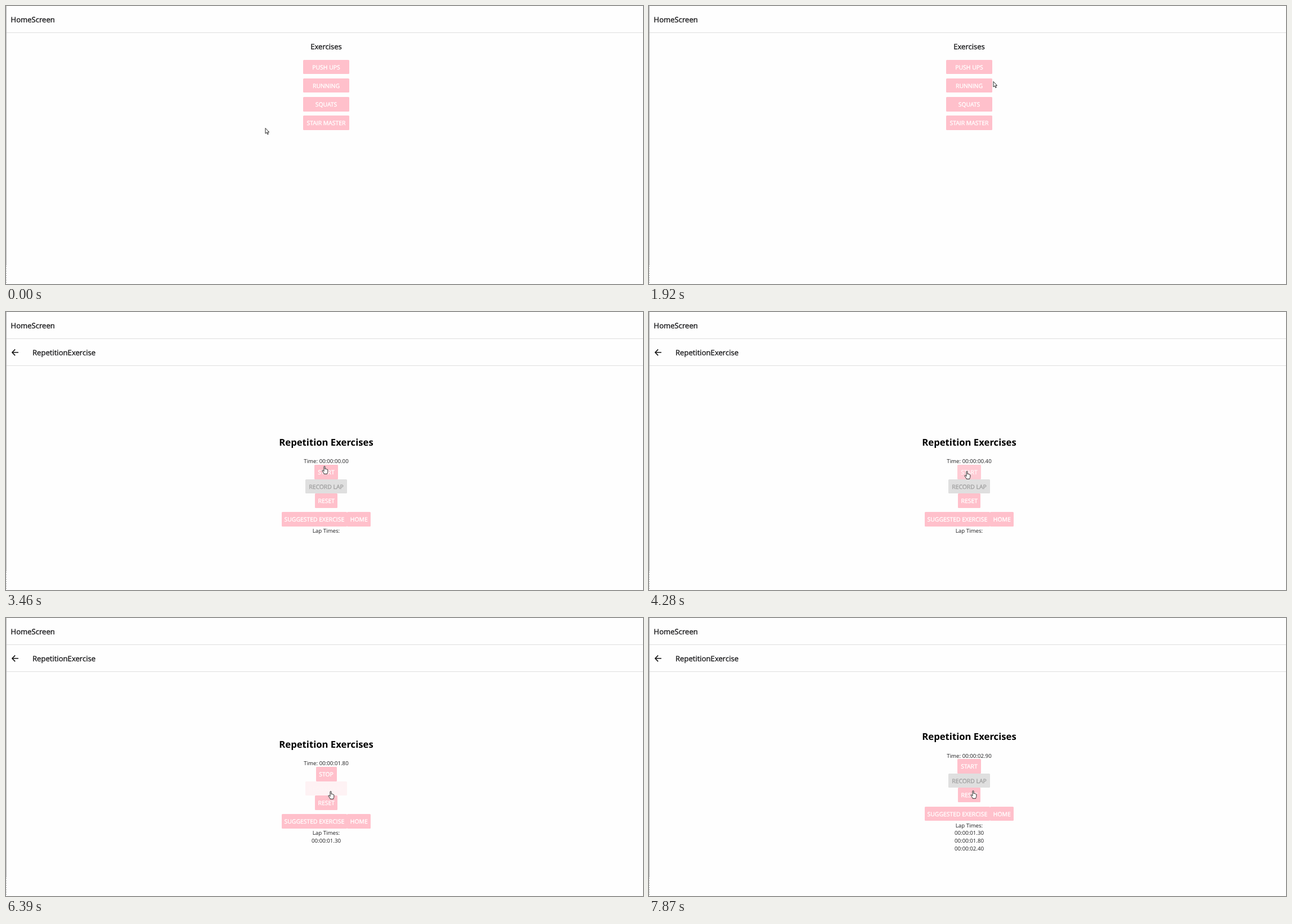
Write an HTML page with a canvas that moves like this. It is 1132 px wide and 495 px high and loops after 7990 ms.

```html
<!DOCTYPE html>
<html lang="en">
<head>
<meta charset="utf-8">
<title>Exercise timer</title>
<style>
  html, body { margin: 0; width: 100%; height: 100%; overflow: hidden; background: #fefefe; }
  canvas { display: block; }
</style>
</head>
<body>
<canvas id="stage" width="1132" height="495"></canvas>
<script>
const ctx = document.getElementById('stage').getContext('2d');
const LOOP = 7990, CENTER = 569, LAP_LINE = 13.7, ROW = 25.5;
const PINK = '#ffc0cb', GRAY = '#dfdfdf', INK = '#1c1c1e';

// Release times of each button; every press lasts PRESS ms
const PRESS = 110, FADE = 250, NAVIGATE = 2850;
const releases = {
  push: [NAVIGATE],
  toggle: [3700, 4130, 4990, 7560],
  lap: [0, 1, 2].map(i => 5920 + 565 * i)
};

// Where the pointer arrives and when; it travels for at most TRAVEL ms
const TRAVEL = 700;
const stops = [
  { at: 0, x: 461, y: 217 },
  { at: 700, x: 563, y: 138 },
  { at: 1170, x: 527, y: 161 },
  { at: 1740, x: 618, y: 138 },
  { at: 2460, x: 577, y: 111 },
  { at: 3560, x: 565, y: 283 },
  { at: 5400, x: 569, y: 315 },
  { at: 5800, x: 577, y: 308 },
  { at: 7430, x: 573, y: 267 },
  { at: 7870, x: 576, y: 307 }
];

const clamp01 = v => Math.min(1, Math.max(0, v));
const smooth = k => k * k * (3 - 2 * k);

function pointerAt(t) {
  const next = stops.findIndex(s => s.at > t);
  if (next < 0) return stops[stops.length - 1];
  const from = stops[next - 1], to = stops[next];
  const travel = Math.min(TRAVEL, to.at - from.at);
  const k = smooth(clamp01((t - to.at + travel) / travel));
  return {
    x: Math.round(from.x + (to.x - from.x) * k),
    y: Math.round(from.y + (to.y - from.y) * k)
  };
}

function opacity(name, t) {
  const up = releases[name].filter(r => r - PRESS <= t).pop();
  if (up === undefined) return 1;
  return 1 - 0.8 * (1 - clamp01((t - up) / FADE)) ** 1.6;
}

// Stopwatch reading in tenths of a second
function tenths(t) {
  return releases.toggle.reduce((sum, start, i, all) =>
    i % 2 ? sum : sum + Math.max(0, Math.floor((Math.min(t, all[i + 1]) - start) / 100)), 0);
}

const clock = n =>
  `00:00:${String(Math.floor(n / 10)).padStart(2, '0')}.${n % 10}0`;

function text(str, x, mid, size, { weight = 400, color = INK, align = 'center', thicken = 0 } = {}) {
  const base = mid + size * 0.357;
  ctx.font = `${weight} ${size}px "Open Sans", "Noto Sans", sans-serif`;
  ctx.textAlign = align;
  ctx.fillStyle = ctx.strokeStyle = color;
  ctx.fillText(str, x, base);
  if (thicken) {
    ctx.lineWidth = thicken;
    ctx.strokeText(str, x, base);
  }
}

function button(label, x, y, w, { alpha = 1, disabled = false } = {}) {
  const top = Math.round(y), left = Math.round(x);
  ctx.globalAlpha = alpha;
  ctx.fillStyle = disabled ? GRAY : PINK;
  ctx.beginPath();
  ctx.roundRect(left, top, Math.round(x + w) - left, Math.round(y + ROW) - top, 1.5);
  ctx.fill();
  text(label, x + w / 2, y + 13.3, 10.4, { color: disabled ? '#a1a1a1' : '#fff', thicken: 0.35 });
  ctx.globalAlpha = 1;
}

function header(y, title, x) {
  ctx.fillStyle = '#dedede';
  ctx.fillRect(1, y + 47, 1131, 1);
  text(title, x, y + 24.4, 13.1, { align: 'left', thicken: 0.4 });
}

function backArrow() {
  ctx.strokeStyle = '#111';
  ctx.lineWidth = 1.6;
  ctx.stroke(new Path2D('M22 72H11.2M16.2 66.6L10.9 72L16.2 77.4'));
}

function homeScreen(t) {
  text('Exercises', CENTER, 72.4, 13.1, { thicken: 0.4 });
  ['PUSH UPS', 'RUNNING', 'SQUATS', 'STAIR MASTER'].forEach((label, i) =>
    button(label, 528, 95.6 + 33.2 * i, 82, { alpha: i ? 1 : opacity('push', t) }));
}

function timerScreen(t) {
  const running = releases.toggle.filter(r => r <= t).length % 2 === 1;
  const laps = releases.lap.filter(r => r <= t);
  const lift = laps.length * LAP_LINE / 2;
  const firstRow = 272 - lift, lastRow = 356.3 - lift, lapTitle = 389.6 - lift;

  header(48, 'RepetitionExercise', 47);
  backArrow();
  text('Repetition Exercises', CENTER, 232 - lift, 16.7, { weight: 700, color: '#000' });
  text('Time: ' + clock(tenths(t)), CENTER, 265.8 - lift, 9.7);

  const alpha = opacity('toggle', t);
  if (running) button('STOP', 550.5, firstRow, 37, { alpha });
  else button('START', 548, firstRow, 42, { alpha });
  button('RECORD LAP', 532, firstRow + ROW, 74, { alpha: opacity('lap', t), disabled: !running });
  button('RESET', 549, firstRow + 2 * ROW, 40.4);
  button('SUGGESTED EXERCISE', 489.6, lastRow, 116.6);
  button('HOME', 606, lastRow, 42.4);

  text('Lap Times:', CENTER, lapTitle, 9.7);
  laps.forEach((r, i) => text(clock(tenths(r)), CENTER, lapTitle + LAP_LINE * (i + 1), 9.7));
}

const arrowShape = new Path2D('M0 0V9.6L2.2 7.6L3.8 11.1L5.3 10.5L3.8 7.1H6.6Z');
const handShape = new Path2D(
  'M-1 1C-1 -.3 1 -.3 1 1V5.2C1.3 4.3 2.7 4.5 2.8 5.5C3.2 4.8 4.4 5 4.5 6' +
  'C5 5.5 5.8 5.9 5.8 6.8V10C5.8 11.5 4.9 12 4.7 13.8H-.8C-1 12.3 -2.6 11 -3.9 8.6' +
  'C-4.4 7.4 -3.1 6.8 -2.3 7.8L-1 9.2Z');

function pointer(t) {
  const { x, y } = pointerAt(t);
  const shape = t > NAVIGATE && y > 262 ? handShape : arrowShape;
  ctx.save();
  ctx.translate(x, y + 0.5);
  ctx.fillStyle = '#fff';
  ctx.strokeStyle = '#111';
  ctx.lineWidth = 0.9;
  ctx.fill(shape);
  ctx.stroke(shape);
  ctx.restore();
}

function draw(t) {
  ctx.fillStyle = '#fefefe';
  ctx.fillRect(0, 0, 1132, 495);
  header(0, 'HomeScreen', 8.5);
  if (t < NAVIGATE) homeScreen(t);
  else timerScreen(t);
  ctx.fillStyle = '#b0b0b0';
  ctx.fillRect(0, 0, 1, 462);
  for (let y = 463; y < 495; y += 4) ctx.fillRect(0, y, 1, 2);
  pointer(t);
}

ctx.textRendering = 'geometricPrecision';
ctx.lineJoin = 'round';
const started = performance.now();
function loop() {
  draw((performance.now() - started) % LOOP);
  requestAnimationFrame(loop);
}
loop();
</script>
</body>
</html>
```
